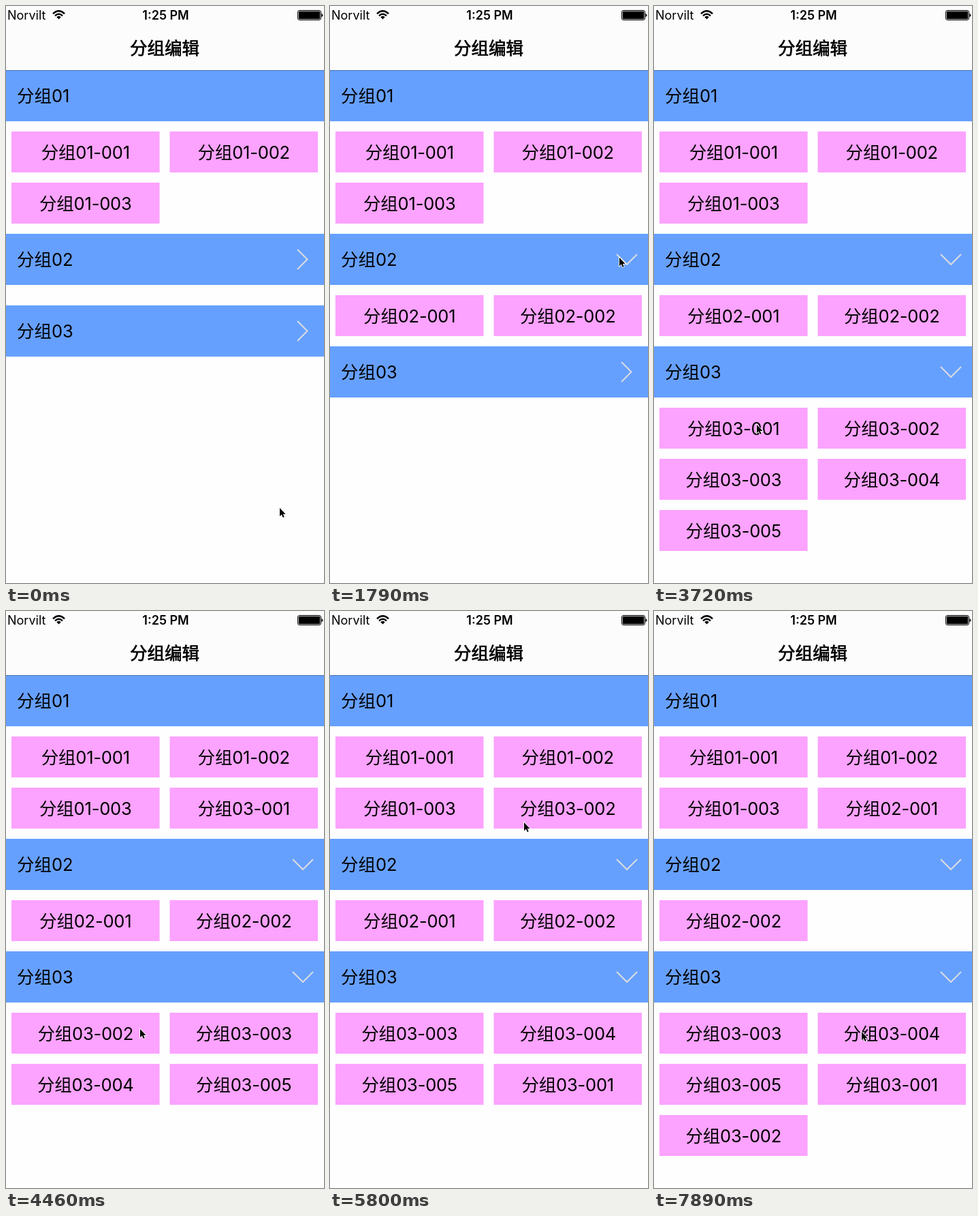
These frames come from a looping animation (467x846 px, 8000 ms). An HTML page:

```html
<!DOCTYPE html>
<html lang="zh-CN">
<head>
<meta charset="utf-8">
<title>分组编辑</title>
<style>
  html, body { margin: 0; width: 100%; height: 100%; overflow: hidden; background: #fefefe; }
  svg { display: block; width: 467px; height: 846px; }
  text { font: 25.5px Inter, "Noto Sans CJK SC", "Noto Sans CJK", sans-serif; }
  .status { font-size: 18px; }
  .clock { font-weight: 600; }
  .title { stroke: #000; stroke-width: .7; }
  .mid { text-anchor: middle; }
  .cell { letter-spacing: -.2px; }
  .chevron { fill: none; stroke: #dadce0; stroke-width: 2; }
</style>
</head>
<body>
<svg viewBox="0 0 467 846">
  <rect width="467" height="846" fill="#fefefe"/>
  <rect width="467" height="94" fill="#fcfcfc"/>
  <text class="status" x="2" y="20">Norvilt</text>
  <text class="status clock mid" x="234.5" y="20">1:25 PM</text>
  <g fill="none" stroke="#000" stroke-width="2.4">
    <path d="M69 11.3Q77.5 3.3 86 11.3M72 14.4Q77.5 9.2 83 14.4"/>
    <path d="M74.3 16.2Q77.5 13.4 80.7 16.2L77.5 19.6Z" fill="#000" stroke="none"/>
  </g>
  <rect x="428.5" y="6.5" width="34" height="14" rx="2.5" fill="none" stroke="#000"/>
  <rect x="429.8" y="7.8" width="31.4" height="11.4" rx="1.2"/>
  <path d="M463.5 11Q465.5 11.5 465.5 13.5T463.5 16Z"/>
  <text class="title mid" x="233" y="70.5">分组编辑</text>
  <g id="list"></g>
  <rect y="94" width="467" height="1" fill="#4673b5"/>
  <path id="cursor" d="M1 2V14.2L3.8 11.6 5.8 16 7.7 15.2 5.8 10.9H9.5Z"
        stroke="#fff" stroke-width="1.6" paint-order="stroke"/>
</svg>
<script>
const LOOP = 8000;
const STEP = 148.6;
const REST = 300;
const list = document.getElementById('list');
const cursor = document.getElementById('cursor');

// The pointer arrives, rests, taps and then leaves for the next stop.
const stop = (arrive, x, y, tap, rest = REST) => ({ arrive, x, y, tap, leave: arrive + rest });
const stops = [
  stop(150, 401, 734),
  stop(970, 281, 540, null, 0),
  stop(1490, 424, 367, '02'),
  stop(2530, 414, 526, '03'),
  stop(3720, 150, 612, '03-001'),
  stop(4460, 196, 611, '03-002'),
  stop(5500, 308, 303, '03-001'),
  stop(5800, 284, 308, null, 0),
  stop(6550, 296, 300, '03-002'),
  stop(7296, 180, 450, '02-001', 0),
  stop(7890, 304, 615)
];

const newGroups = () => [3, 2, 5].map((count, g) => ({
  name: '0' + (g + 1),
  open: g === 0,
  items: Array.from({ length: count }, (_, i) => `0${g + 1}-00${i + 1}`)
}));

// A header tap opens its group; an item tap moves it into the first group or back home.
function applyTap(groups, name) {
  const home = groups.find(group => name.startsWith(group.name));
  if (name === home.name) {
    home.open = true;
    return;
  }
  const from = groups.find(group => group.items.includes(name));
  from.items = from.items.filter(item => item !== name);
  (from === home ? groups[0] : home).items.push(name);
}

const text = (x, y, label, cls = '') => `<text class="${cls}" x="${x}" y="${y}">分组${label}</text>`;

function header(group, y, index) {
  const chevron = group.open
    ? `M421 ${y + 30}l15 15 15-15`
    : `M428 ${y + 23}l14.5 14.5-14.5 14.5`;
  return `<rect y="${y}" width="467" height="75" fill="#66a0ff"/>` +
    text(16, y + 46.5, group.name) +
    (index ? `<path class="chevron" d="${chevron}"/>` : '');
}

function cell(label, i, top) {
  const x = i % 2 ? 240.5 : 8;
  const y = top + 75 * Math.floor(i / 2);
  return `<rect x="${x}" y="${y}" width="217.5" height="60" fill="#fca2ff"/>` +
    text(x + 108.75, y + 39.5, label, 'cell mid');
}

function drawList(groups) {
  let y = 94;
  list.innerHTML = groups.map((group, index) => {
    const items = group.open ? group.items : [];
    const markup = header(group, y, index) + items.map((label, i) => cell(label, i, y + 90)).join('');
    y += 75 + (items.length ? 15 + 75 * Math.ceil(items.length / 2) : 30);
    return markup;
  }).join('');
}

// The pointer is sampled once per STEP and eases between stops.
function cursorAt(t) {
  const i = stops.findLastIndex(s => s.leave <= t);
  if (i < 0) return [stops[0].x, stops[0].y];
  const from = stops[i];
  const to = stops[i + 1] || from;
  const steps = Math.max(1, Math.round((to.arrive - from.leave) / STEP));
  const p = Math.min(1, Math.floor((t - from.leave) / (to.arrive - from.leave) * steps + 1e-6) / steps);
  const u = p * p * (3 - 2 * p);
  return [from.x + (to.x - from.x) * u, from.y + (to.y - from.y) * u];
}

let shown = -1;
function frame() {
  const t = performance.now() % LOOP;
  const taps = stops.filter(s => s.tap && s.leave <= t);
  if (taps.length !== shown) {
    const groups = newGroups();
    taps.forEach(s => applyTap(groups, s.tap));
    drawList(groups);
    shown = taps.length;
  }
  cursor.setAttribute('transform', `translate(${cursorAt(t)})`);
  requestAnimationFrame(frame);
}
frame();
</script>
</body>
</html>
```
